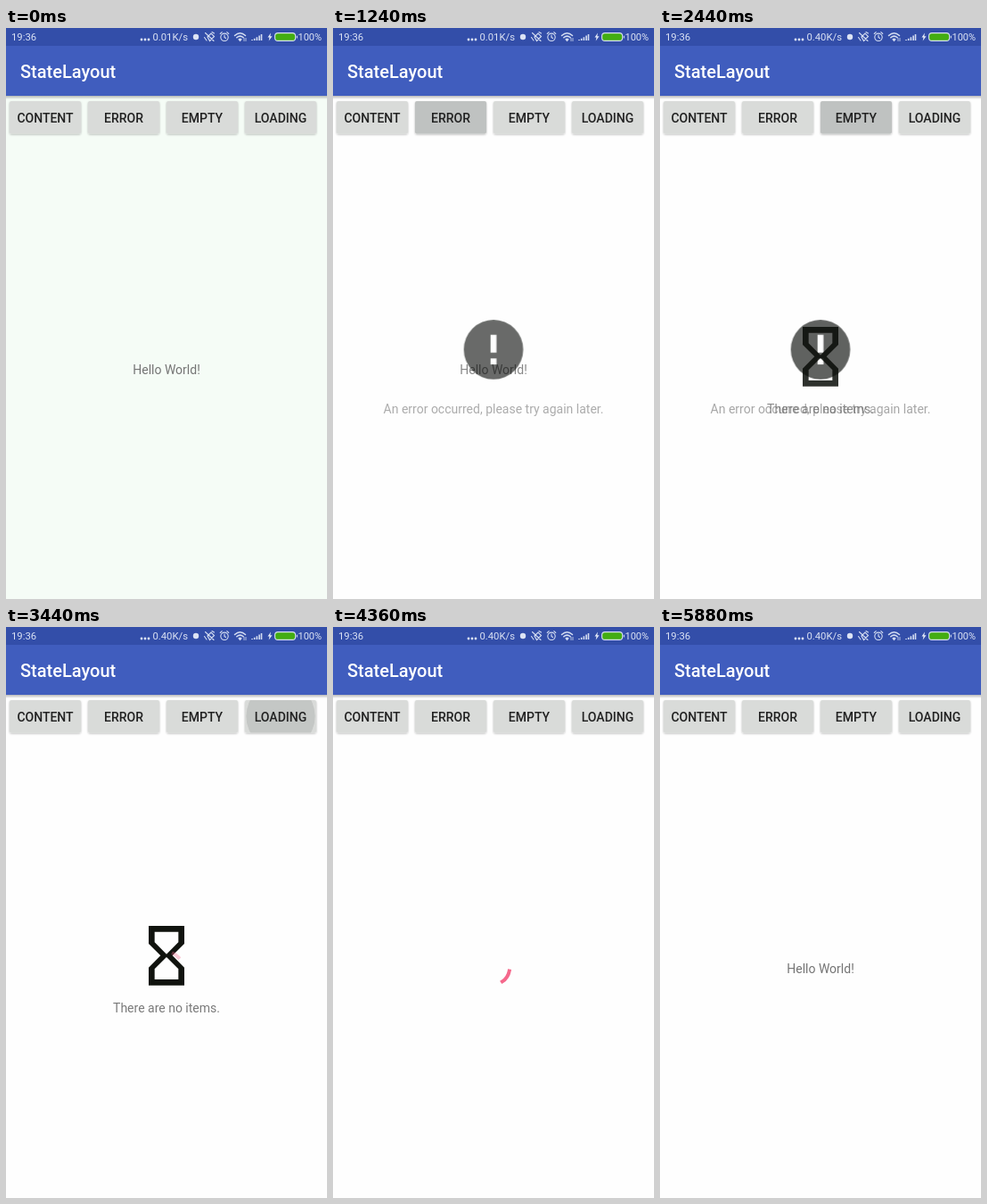
An HTML page for the animation above (6.24 s loop, 360 px wide and 640 px high).

```html
<!DOCTYPE html>
<html lang="en">
<head>
<meta charset="utf-8">
<title>StateLayout</title>
<style>
  html, body { margin: 0; width: 100%; height: 100%; overflow: hidden; background: #fefefe; }
  svg { display: block; width: 360px; height: 640px; font-family: Roboto, sans-serif; }
  .label { font-size: 14px; font-weight: 500; fill: #212121; text-anchor: middle; }
  .body { font-size: 14px; fill: #757575; text-anchor: middle; }
  .status { font-size: 11.3px; fill: #dce3f4; }
  .line { fill: none; stroke: #d5def2; stroke-width: 1.1; stroke-linecap: round; }
</style>
</head>
<body>
<svg viewBox="0 0 360 640">
  <defs>
    <linearGradient id="shade" x1="0" y1="0" x2="0" y2="1">
      <stop offset="0" stop-color="#000" stop-opacity=".27"/>
      <stop offset="1" stop-color="#000" stop-opacity="0"/>
    </linearGradient>
    <filter id="lift" x="-10%" y="-20%" width="120%" height="150%">
      <feDropShadow dx="0" dy="1" stdDeviation="1" flood-opacity=".28"/>
    </filter>
  </defs>

  <rect id="page" width="360" height="640" fill="#fefefe"/>

  <g id="content"><text class="body" x="180" y="387.5">Hello World!</text></g>

  <g id="error">
    <path fill="#050805" fill-rule="evenodd" transform="translate(140 320.4) scale(3.3333)"
      d="M12 2a10 10 0 1 0 0 20a10 10 0 1 0 0-20zM11 7h2v6h-2zM11 15h2v2h-2z"/>
    <text class="body" x="180" y="431.5">An error occurred, please try again later.</text>
  </g>

  <g id="empty">
    <path fill="#080b06" fill-rule="evenodd" transform="translate(140 328.3) scale(3.3333)"
      d="M6 2V8L10 12L6 16V22H18V16L14 12L18 8V2zM16 16.5V20H8V16.5L12 12.5zM12 11.5L8 7.5V4H16V7.5z"/>
    <text class="body" x="180" y="431.5">There are no items.</text>
  </g>

  <g id="loading">
    <path id="arc" fill="none" stroke="#f5688c" stroke-width="4" stroke-linecap="square"/>
  </g>

  <rect y="76" width="360" height="4" fill="url(#shade)"/>
  <rect y="20" width="360" height="56" fill="#405dbe"/>
  <rect width="360" height="20" fill="#334ea9"/>
  <text x="16" y="56" font-size="20" font-weight="500" fill="#fff">StateLayout</text>

  <g id="buttons"></g>

  <g class="status">
    <text x="6" y="14.3">19:36</text>
    <text id="speed" x="204" y="14.3" text-anchor="end">0.01K/s</text>
    <text x="327.5" y="14.3" font-size="11">100%</text>
    <circle cx="152" cy="13" r="1.4"/><circle cx="156" cy="13" r="1.4"/><circle cx="160" cy="13" r="1.4"/>
    <circle cx="213" cy="10" r="3.2"/>
  </g>
  <g class="line">
    <path d="M226 10l4-4l3.5 3.5l-5 5zM223.5 5.5l9.5 9M222.5 10.5l2.5 3.5M231 4.5l2.5 1.5"/>
    <circle cx="245" cy="10.3" r="4.2"/>
    <path d="M245 8v2.5l1.6 1M240.2 6.5l2-1.8M249.8 6.5l-2-1.8"/>
    <path d="M256.5 8.5q6-5.5 12 0M258.8 10.8q3.7-3.4 7.4 0" stroke-width="1.5"/>
    <path d="M261 12.8q1.5-1.3 3 0l-1.5 1.6z" fill="#d5def2"/>
    <path d="M267 11.5v3M269 11.5v3" stroke-width=".8"/>
    <path d="M276 14v-1M278.7 14v-2.2M281.4 14v-3.8M284.1 14v-5.4M286.5 14v-7" stroke-width="1.6" stroke-linecap="butt"/>
    <path d="M297 5.5l-3.5 5h2l-.8 4l3.8-5.3h-2.2z" fill="#e4eaf7" stroke="none"/>
    <rect x="301.6" y="5.6" width="23" height="8.8" rx="3.4" fill="#43ad12"/>
    <path d="M326.3 9v2"/>
  </g>
</svg>
<script>
const LOOP = 6240, FADE = 300;
const TO_ERROR = 1130, TO_EMPTY = 2260, TO_LOADING = 3385, TO_CONTENT = 4770;
const SPIN_START = 3330, TURN = 1333;
const $ = id => document.getElementById(id);
const clamp = v => Math.max(0, Math.min(1, v));

const buttons = [
  { name: "CONTENT", down: 4560, up: 4930, end: 5440 },
  { name: "ERROR", down: 840, up: 1290, end: 1840 },
  { name: "EMPTY", down: 2040, up: 2460, end: 3000 },
  { name: "LOADING", down: 3280, up: 3450, end: 3700 }
];

$("buttons").innerHTML = buttons.map((b, i) => {
  const x = 4 + 88 * i;
  const box = `x="${x}" y="82" width="80" height="36.5" rx="2"`;
  return `<clipPath id="clip${i}"><rect ${box}/></clipPath>
    <rect ${box} fill="#d9dbd9" filter="url(#lift)"/>
    <circle id="ripple${i}" cx="${x + 40}" cy="100" fill="#001010" clip-path="url(#clip${i})"/>
    <text class="label" x="${x + 40}" y="105.5">${b.name}</text>`;
}).join("");

const fadeIn = (t, start) => 1 - (1 - clamp((t - start) / FADE)) ** 2;
const fadeOut = (t, start) => 1 - clamp((t - start) / FADE) ** 2;

function show(id, alpha) {
  $(id).setAttribute("opacity", alpha.toFixed(3));
}

// Cubic bezier (.4, 0, .2, 1), solved for x by bisection.
function fastOutSlowIn(x) {
  let lo = 0, hi = 1;
  for (let i = 0; i < 20; i++) {
    const u = (lo + hi) / 2, v = 1 - u;
    if (1.2 * v * v * u + 0.6 * v * u * u + u ** 3 < x) lo = u; else hi = u;
  }
  return 3 * (1 - lo) * lo * lo + lo ** 3;
}

function point(deg) {
  const a = deg * Math.PI / 180;
  return `${(180 + 18 * Math.sin(a)).toFixed(2)} ${(382.3 - 18 * Math.cos(a)).toFixed(2)}`;
}

function drawSpinner(t) {
  const age = Math.max(0, t - SPIN_START);
  const p = age % TURN / TURN;
  const head = 270 * fastOutSlowIn(clamp(p * 2));
  const tail = 270 * fastOutSlowIn(clamp(p * 2 - 1));
  const base = 90 * p + age * 720 / 4444;
  const from = base + tail, to = base + Math.max(head, tail + 1);
  $("arc").setAttribute("d", `M${point(from)}A18 18 0 ${to - from > 180 ? 1 : 0} 1 ${point(to)}`);
}

function draw(t) {
  $("page").setAttribute("fill", t < 120 ? "#f5fcf6" : "#fefefe");
  $("speed").textContent = t >= 120 && t >= 2040 ? "0.40K/s" : "0.01K/s";

  show("content", t < TO_CONTENT ? fadeOut(t, TO_ERROR) : fadeIn(t, TO_CONTENT));
  show("error", fadeIn(t, TO_ERROR) * fadeOut(t, TO_EMPTY));
  show("empty", fadeIn(t, TO_EMPTY) * fadeOut(t, TO_LOADING));
  show("loading", t < TO_CONTENT ? fadeIn(t, TO_LOADING) : 0);
  drawSpinner(t);

  buttons.forEach((b, i) => {
    const grow = clamp((t - b.down) / 200);
    const fade = 1 - clamp((t - b.up) / (b.end - b.up));
    $("ripple" + i).setAttribute("r", 8 + 38 * grow);
    show("ripple" + i, 0.12 * grow * fade);
  });
}

const begin = performance.now();
function tick() {
  draw((performance.now() - begin) % LOOP);
  requestAnimationFrame(tick);
}
tick();
</script>
</body>
</html>
```
